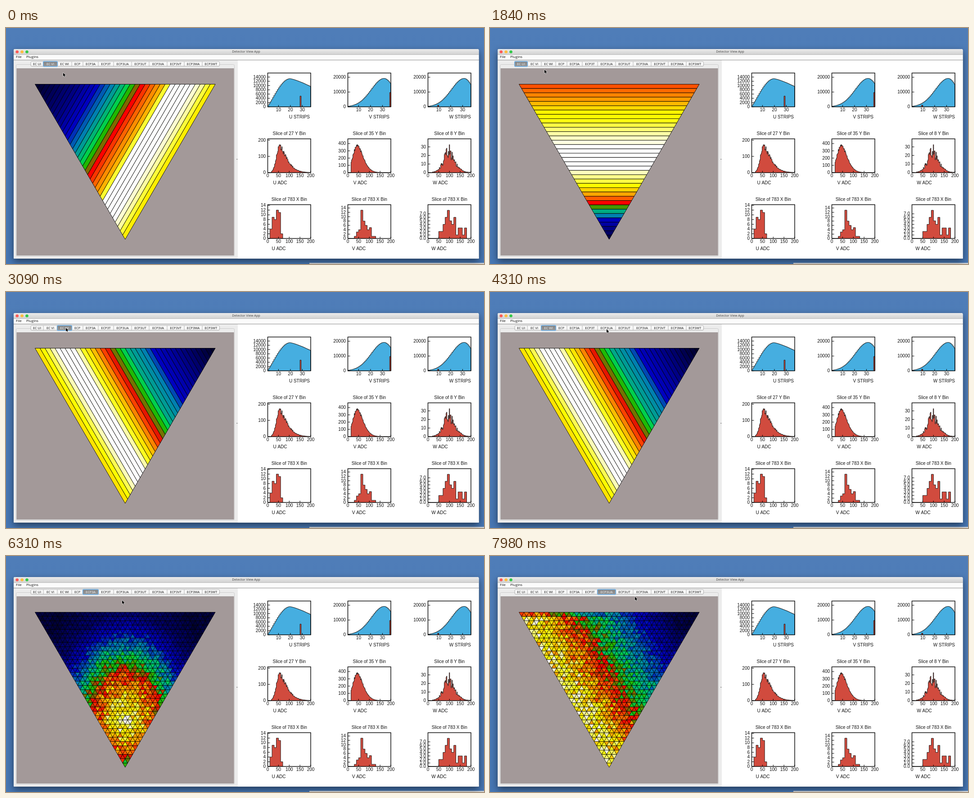
Write an HTML page with a canvas that moves like this. It is 1062 px wide and 527 px high and loops after 8000 ms.

```html
<!DOCTYPE html>
<html lang="en">
<head>
<meta charset="utf-8">
<title>Detector View App</title>
<style>
html, body { margin: 0; width: 100%; height: 100%; overflow: hidden; background: #4c7bb7; }
canvas { display: block; }
</style>
</head>
<body>
<canvas id="stage" width="1062" height="527"></canvas>
<script>
const W = 1062, H = 527, LOOP = 8000, STEP = 89;
const UI_FONT = '"Open Sans", "Noto Sans", sans-serif';
const PLOT_FONT = '"Liberation Sans", Arial, sans-serif';
const RED = '#d14b3e', BLUE = '#46aee0';

const PALETTE = [
  '#00002a', '#000050', '#000078', '#0000a0', '#0000c0', '#0048b4',
  '#0080b0', '#00a888', '#00d04c', '#20b800', '#806800', '#ff0000',
  '#ff5000', '#ff9000', '#ffc800', '#ffff00', '#ffffa0', '#ffffff'
].map(hex => [1, 3, 5].map(i => parseInt(hex.slice(i, i + 2), 16)));

const TABS = ['EC UI', 'EC VI', 'EC WI', 'ECP', 'ECP3A', 'ECP3T', 'ECP3UA', 'ECP3UT', 'ECP3VA', 'ECP3VT', 'ECP3WA', 'ECP3WT'];
const TAB_X = [55, 83, 114, 146, 171, 205, 239, 279, 318, 358, 396, 436, 474.5];

// Start time, selected tab, pressed tab
const STATES = [
  [0, 1, -1], [1160, 1, 0], [1340, 0, -1], [2910, 0, 2], [3090, 2, -1],
  [5540, 2, 4], [5630, 4, -1], [7480, 4, 6], [7560, 6, -1]
];

// Pointer moves: start, end, way points
const MOVES = [
  [0, 0, [127, 100]],
  [90, 90, [135, 99]],
  [360, 1160, [132, 98], [112, 94], [74, 80]],
  [1250, 1250, [72, 79]],
  [1670, 1840, [88, 86], [121, 93]],
  [1930, 2470, [131, 92], [138, 88], [132, 81]],
  [2560, 2560, [133, 80]],
  [3270, 3270, [132, 80]],
  [3420, 4130, [170, 118], [387, 341], [259, 83]],
  [4490, 4490, [260, 82]],
  [4840, 5360, [252, 84], [163, 82], [185, 81]],
  [6080, 6080, [185, 83]],
  [6220, 6310, [225, 94], [258, 99]],
  [6400, 6940, [275, 98], [282, 90], [272, 82]],
  [7120, 7300, [270, 81], [267, 81]],
  [7830, 7830, [269, 82]],
  [7980, 7980, [322, 91]]
];

// Strip index and palette level
const U_LEVELS = [[0, 12], [3, 13.2], [6, 14.8], [8, 15.1], [14, 17], [19, 17], [20, 16.3], [23, 15],
  [25, 13.4], [27, 11], [28, 9.4], [29, 7.1], [30, 6], [31, 3.8], [35, .8]];
const V_LEVELS = [[0, .2], [8, 2.2], [12, 4], [18, 8], [21, 11], [25, 13.6], [27, 17], [31, 17], [33, 16], [35, 14.7]];
const W_LEVELS = [[0, 14.5], [2, 15.5], [4, 17], [7, 17], [9, 15.2], [11, 13.8], [14, 10.8], [17, 8],
  [18, 7], [21, 6], [23, 4], [35, 0]];

// Distance and palette level
const RADIAL = [[0, 15.5], [30, 15.2], [95, 11.7], [130, 8.6], [175, 5], [235, 1.7], [300, .5]];
const SLOPED = [[64, 15.4], [100, 15], [175, 11.2], [210, 9], [250, 7], [320, 4], [400, 1], [465, .3]];

const lerp = (a, b, k) => a + (b - a) * k;
const clamp = (v, lo, hi) => Math.max(lo, Math.min(hi, v));
const range = (count, make) => Array.from({ length: count }, (_, i) => make(i));

function curve(points, x) {
  if (x <= points[0][0]) return points[0][1];
  for (let i = 1; i < points.length; i++) {
    const [x0, y0] = points[i - 1], [x1, y1] = points[i];
    if (x <= x1) return lerp(y0, y1, (x - x0) / (x1 - x0));
  }
  return points[points.length - 1][1];
}

function shade(value) {
  const v = clamp(value, 0, PALETTE.length - 1), i = Math.min(Math.floor(v), PALETTE.length - 2);
  return `rgb(${PALETTE[i].map((c, n) => Math.round(lerp(c, PALETTE[i + 1][n], v - i)))})`;
}

function seeded(seed) {
  return () => {
    seed = (seed + 0x6d2b79f5) | 0;
    let n = Math.imul(seed ^ (seed >>> 15), 1 | seed);
    n = (n + Math.imul(n ^ (n >>> 7), 61 | n)) ^ n;
    return ((n ^ (n >>> 14)) >>> 0) / 4294967296;
  };
}

function layer(draw) {
  const c = document.createElement('canvas');
  c.width = W;
  c.height = H;
  draw(c.getContext('2d'));
  return c;
}

function label(g, text, x, y, size, align = 'center', font = PLOT_FONT, color = '#111') {
  g.font = `${size}px ${font}`;
  g.textAlign = align;
  g.textBaseline = 'middle';
  g.fillStyle = color;
  g.fillText(text, x, y);
}

function box(g, x, y, w, h, color) {
  g.fillStyle = color;
  g.fillRect(x, y, w, h);
}

function vertical(g, y0, y1, top, bottom) {
  const fill = g.createLinearGradient(0, y0, 0, y1);
  fill.addColorStop(0, top);
  fill.addColorStop(1, bottom);
  return fill;
}

// Detector geometry: N strips per side of a triangle pointing down
const N = 36, LEFT = 64.5, TOP = 125.5, DX = 400.5 / N, DY = 346.5 / N;
const node = (col, row) => [LEFT + DX * (col + row / 2), TOP + DY * row];

function cell(g, corners, color) {
  g.beginPath();
  corners.forEach(p => g.lineTo(...p));
  g.closePath();
  g.fillStyle = color;
  g.fill();
  g.stroke();
}

function drawStrips(g, levels, corners) {
  g.lineWidth = .9;
  g.strokeStyle = '#000';
  for (let i = 0; i < N; i++) cell(g, corners(i, i + 1, N - i), shade(curve(levels, i)));
}

const uStrip = (i, j, rest) => [node(0, i), node(rest, i), node(rest - 1, j), node(0, j)];
const vStrip = (i, j) => [node(i, 0), node(j, 0), node(0, j), node(0, i)];
const wStrip = (i, j, rest) => [node(i, 0), node(j, 0), node(j, rest - 1), node(i, rest)];

function drawPixels(g, seed, level) {
  const rand = seeded(seed);
  const paint = corners => {
    const [x, y] = [0, 1].map(n => corners.reduce((sum, p) => sum + p[n], 0) / 3);
    const v = level(x, y), spread = clamp(v * .24, .5, 2.3);
    cell(g, corners, shade(v + (rand() + rand() - 1) * spread));
  };
  g.lineWidth = .8;
  g.strokeStyle = '#000';
  for (let r = 0; r < N; r++) {
    for (let c = 0; c < N - r; c++) {
      paint([node(c, r), node(c + 1, r), node(c, r + 1)]);
      if (c < N - r - 1) paint([node(c + 1, r), node(c + 1, r + 1), node(c, r + 1)]);
    }
  }
}

function hotSpot(x, y) {
  const dy = y - 362;
  return curve(RADIAL, Math.hypot((x - 265) * 1.4, dy > 0 ? dy * 1.15 : dy));
}

function slope(x, y) {
  const v = curve(SLOPED, x - (y - TOP) * .577);
  return y < TOP + DY && v > 7 ? v - 2.2 : v;
}

const views = {
  0: layer(g => drawStrips(g, U_LEVELS, uStrip)),
  1: layer(g => drawStrips(g, V_LEVELS, vStrip)),
  2: layer(g => drawStrips(g, W_LEVELS, wStrip)),
  4: layer(g => drawPixels(g, 11, hotSpot)),
  6: layer(g => drawPixels(g, 29, slope))
};

// Plots
const PW = 95.5, PH = 75.5;

function histogram(g, x, base, heights, width, color) {
  g.beginPath();
  g.moveTo(x, base);
  heights.forEach((h, i) => {
    g.lineTo(x + i * width, base - h);
    g.lineTo(x + (i + 1) * width, base - h);
  });
  g.lineTo(x + heights.length * width, base);
  g.fillStyle = color;
  g.fill();
  g.lineWidth = .9;
  g.strokeStyle = '#111';
  g.stroke();
}

function axes(g, x, y, xTicks, yTicks) {
  const base = y + PH;
  g.strokeStyle = '#000';
  g.lineWidth = 1.4;
  g.strokeRect(x, y, PW, PH);
  g.lineWidth = 1;
  g.beginPath();
  for (const [text, dx] of xTicks) {
    g.moveTo(x + dx, base);
    g.lineTo(x + dx, base - 4);
    label(g, text, x + dx, base + 7.5, 10);
  }
  for (const [text, dy] of yTicks) {
    g.moveTo(x, base - dy);
    g.lineTo(x + 5, base - dy);
    label(g, text, x - 4.5, base - dy + .5, 10, 'right');
  }
  g.stroke();
}

const ticks = (count, step, px, digits = 0) => range(count, i => [(i * step).toFixed(digits), i * px]);

// Peak with its own width and steepness on each side
const peak = (center, height, left, steepL, right, steepR) => i => height *
  Math.exp(-(i < center ? ((center - i) / left) ** steepL : ((i - center) / right) ** steepR));

const broad = i => i < 18 ? 63 * Math.sin(Math.PI / 2 * (i + 1) / 19.5) ** 1.2 : 63 - 17 * ((i - 18) / 17) ** 1.3;
const late = drop => i => i < 30 ? 63.5 * Math.exp(-(((30 - i) / 15.3) ** 2)) : 63.5 - drop * ((i - 30) / 5) ** 1.8;

const COLS = [
  {
    name: 'U', x: 581.5, bin: 27, end: 675, barHeight: 24,
    top: broad, topTicks: ticks(8, 2000, 9.5),
    mid: peak(26, 60, 9.9, 2, 21.3, 1.45), from: 8, noise: .24, spike: 26, midTicks: ticks(3, 100, 36.3),
    low: [0, 4, 9, 8, 12, 11, 2], unit: 5.28, lowTicks: ticks(8, 2, 10.56)
  },
  {
    name: 'V', x: 759.5, bin: 35, end: 852, barHeight: 32,
    top: late(10), topTicks: ticks(3, 10000, 33),
    mid: peak(21, 62, 14.3, 2, 17.6, 1.6), from: 7, noise: .12, spike: 21, midTicks: ticks(5, 100, 16.25),
    low: [0, 0, 0, 1, 3, 4, 13, 8, 6, 4, 5, 1, 1], unit: 4.86, lowTicks: ticks(8, 2, 9.72)
  },
  {
    name: 'W', x: 937.5, bin: 8, end: 1033, barHeight: 3.5,
    top: late(12), topTicks: ticks(3, 10000, 33),
    mid: peak(45, 46, 15.5, 1.8, 18, 1.7), from: 10, noise: .6, spike: 47, midTicks: ticks(4, 10, 19.2),
    low: [0, 0, 0, 0, 0, 2, 2, 4, 6, 8, 5, 4, 6, 1, 3, 3, 1, 3], unit: 7.87, lowTicks: ticks(8, 1, 7.87, 1)
  }
];

function drawPlots(g) {
  const rand = seeded(5), strip = PW / N;
  const stripTicks = [10, 20, 30].map(v => [v, (v - 1) * strip]);
  const adcTicks = ticks(5, 50, PW / 4);
  for (const c of COLS) {
    const mid = c.x + PW / 2;

    histogram(g, c.x, 176, range(N, c.top), strip, BLUE);
    histogram(g, c.x + c.bin * strip, 176, [c.barHeight], strip, RED);
    axes(g, c.x, 100.5, stripTicks, c.topTicks);
    label(g, c.name + ' STRIPS', c.end, 199.5, 10, 'right');

    const slice = range(95, i => {
      const wobble = 1 + (rand() - .5) * c.noise;
      if (i === c.spike) return 62.5;
      return i < c.from ? 0 : Math.min(62, c.mid(i) * wobble + rand() * c.noise * 2);
    });
    histogram(g, c.x, 323, slice, PW / 95, RED);
    axes(g, c.x, 247.5, adcTicks, c.midTicks);
    label(g, `Slice of ${c.bin} Y Bin`, mid, 236.5, 10);
    label(g, c.name + ' ADC', c.x + 27.5, 346.5, 10);

    histogram(g, c.x, 470, c.low.map(n => n * c.unit), PW / 20, RED);
    axes(g, c.x, 394.5, adcTicks, c.lowTicks);
    label(g, 'Slice of 783 X Bin', mid, 383.5, 10);
    label(g, c.name + ' ADC', c.x + 24.5, 493.5, 10);
  }
}

const scene = layer(g => {
  box(g, 0, 0, W, H, vertical(g, 0, H, '#4f7db8', '#4676b3'));
  box(g, 674, 524.5, 388, 3, '#d6d6d6');

  g.save();
  g.shadowColor = 'rgba(0,0,0,.5)';
  g.shadowBlur = 16;
  g.shadowOffsetY = 6;
  g.fillStyle = '#ececec';
  g.beginPath();
  g.roundRect(17, 47, 1033.5, 468, [3, 3, 1, 1]);
  g.fill();
  g.restore();

  g.fillStyle = vertical(g, 47, 59, '#ebebeb', '#d2d2d2');
  g.beginPath();
  g.roundRect(17, 47, 1033.5, 12.5, [3, 3, 0, 0]);
  g.fill();
  box(g, 17, 59, 1033.5, .8, '#b4b4b4');
  ['#fc5b57', '#fdbc40', '#34c84a'].forEach((color, i) => {
    g.fillStyle = color;
    g.beginPath();
    g.arc(24.7 + i * 10.9, 53.3, 3.3, 0, Math.PI * 2);
    g.fill();
  });
  label(g, 'Detector View App', 533.5, 53.5, 7.3, 'center', UI_FONT, '#444');

  box(g, 17, 60, 1033.5, 11, '#fbfbfb');
  box(g, 17, 71, 1033.5, 1, '#8c8c8c');
  label(g, 'File', 22, 65.3, 8, 'left', UI_FONT);
  label(g, 'Plugins', 45, 65.3, 8, 'left', UI_FONT);

  box(g, 515, 72, 535.5, 443, '#fff');
  box(g, 512, 292.5, 2.5, 1.2, '#777');
  g.strokeStyle = '#cbcbcb';
  g.lineWidth = 1;
  g.beginPath();
  g.roundRect(22.5, 81.5, 485, 428, 3);
  g.stroke();
  box(g, 24, 90.5, 482, 417, '#a39999');
  g.strokeStyle = '#8f8787';
  g.lineWidth = .7;
  g.strokeRect(24, 90.5, 482, 417);
  drawPlots(g);
});

function drawTabs(g, selected, pressed) {
  const y = 75, h = 10.5, first = TAB_X[0], last = TAB_X[TABS.length];
  g.fillStyle = vertical(g, y, y + h, '#ffffff', '#f0f0f0');
  g.strokeStyle = '#9d9d9d';
  g.lineWidth = .8;
  g.beginPath();
  g.roundRect(first, y, last - first, h, 2.5);
  g.fill();
  g.stroke();
  TABS.forEach((name, i) => {
    const x = TAB_X[i], w = TAB_X[i + 1] - x;
    if (i === pressed) box(g, x + .4, y + .4, w - .8, h - .8, '#cdcdcd');
    if (i) box(g, x - .4, y, .8, h, '#a5a5a5');
    if (i === selected) box(g, x, y, w, h, vertical(g, y, y + h, '#858585', '#969696'));
    label(g, name, x + w / 2, y + 5.6, 7.3, 'center', UI_FONT, i === selected ? '#f4f4f4' : '#111');
  });
  const x = TAB_X[selected], w = TAB_X[selected + 1] - x;
  g.strokeStyle = '#70aee2';
  g.lineWidth = 1.6;
  g.beginPath();
  g.roundRect(x - .3, y - .4, w + .6, h + .8, 2);
  g.stroke();
}

const ARROW = [[0, 0], [0, 8], [1.9, 6.3], [3.1, 9], [4.4, 8.4], [3.2, 5.9], [5.6, 5.8]];

function drawPointer(g, [x, y]) {
  g.beginPath();
  ARROW.forEach(([dx, dy]) => g.lineTo(x + dx, y + dy));
  g.closePath();
  g.lineJoin = 'round';
  g.lineWidth = 1.2;
  g.strokeStyle = 'rgba(255,255,255,.8)';
  g.stroke();
  g.fillStyle = '#000';
  g.fill();
}

const current = (list, t) => list.filter(item => item[0] <= t).pop();

function pointerAt(t) {
  const [start, end, ...points] = current(MOVES, t);
  if (points.length === 1) return points[0];
  const last = Math.round((end - start) / STEP);
  const step = Math.floor((t - start) / (end - start) * last + .15);
  const at = clamp(step / last, 0, 1) * (points.length - 1);
  const i = Math.min(Math.floor(at), points.length - 2);
  return points[i].map((v, n) => lerp(v, points[i + 1][n], at - i));
}

const ctx = document.getElementById('stage').getContext('2d');
let origin = null;

function render(now) {
  if (origin === null) origin = now;
  const t = (now - origin) % LOOP;
  const [, selected, pressed] = current(STATES, t);
  ctx.drawImage(scene, 0, 0);
  ctx.drawImage(views[selected], 0, 0);
  drawTabs(ctx, selected, pressed);
  drawPointer(ctx, pointerAt(t));
  requestAnimationFrame(render);
}
requestAnimationFrame(render);
</script>
</body>
</html>
```
